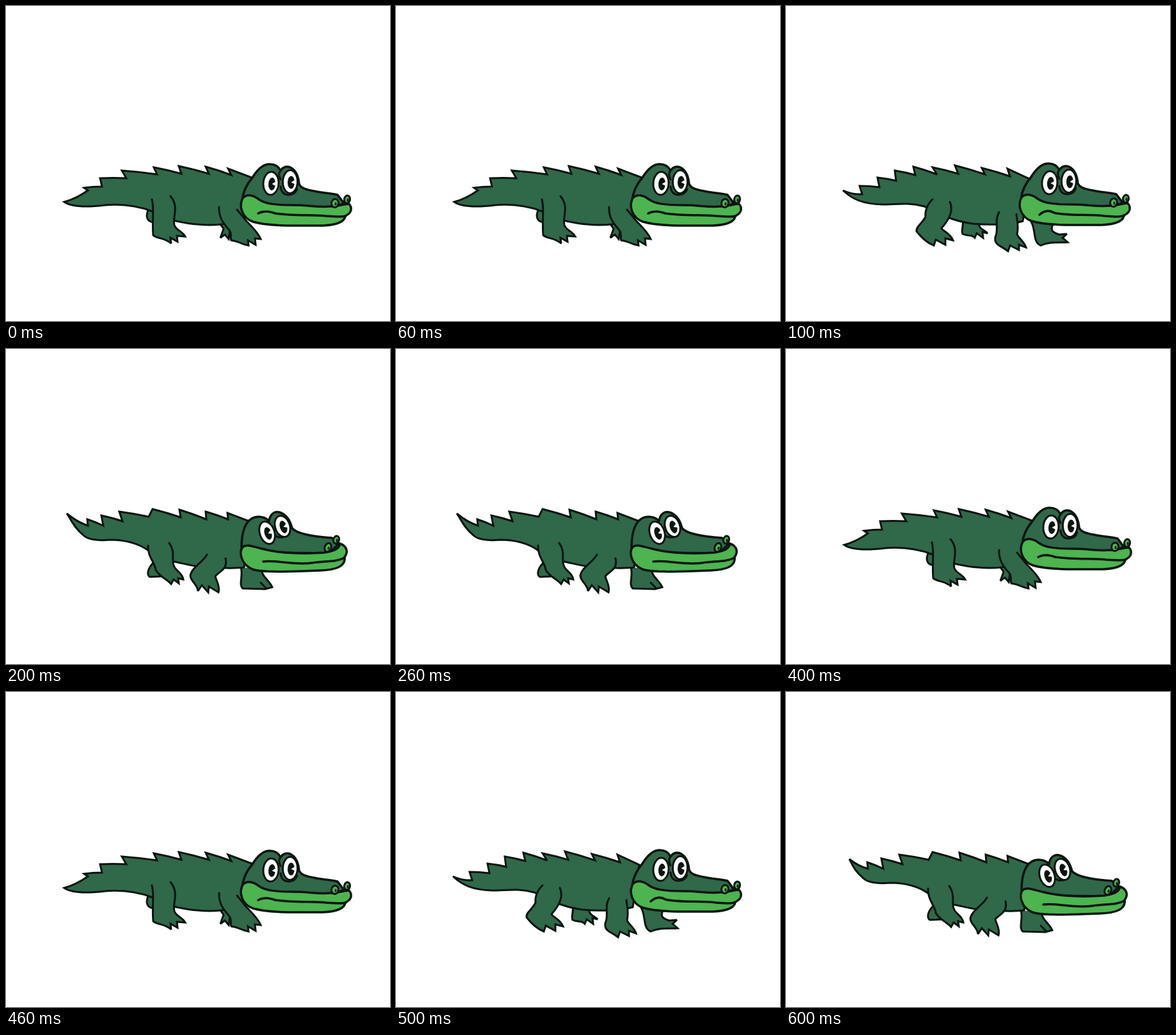
These frames come from a looping animation (600 by 492 pixels, 700 ms). An HTML page with a canvas:

```html
<!DOCTYPE html>
<html lang="en">
<head>
<meta charset="utf-8">
<title>Walking crocodile</title>
<style>
html, body { margin: 0; width: 100%; height: 100%; overflow: hidden; background: #fff; }
canvas { display: block; }
</style>
</head>
<body>
<canvas id="stage" width="600" height="492"></canvas>
<script>
const ctx = document.getElementById('stage').getContext('2d');
const INK = '#0b1510', LIGHT = '#4db450', SKIN = '#30684a';

// Heads: top of skull, jaw, mouth, ridge between the eyes, nostrils and eyes [x, y, rx, ry, tilt]
const levelHead = {
  skull: 'M369 303C371 287 378 276 385 268C393 255 402 247 412 247C420 247 426 251 429 257C433 251 440 249 446 253C454 258 457 267 458 278C461 285 470 287 481 289C494 292 507 292 518 295L528 308L508 316L400 314Z',
  jaw: 'M370 300C376 293 386 295 395 302C405 309 421 311 449 311C474 311 488 315 507 313C519 313 528 309 536 309C541 315 541 323 530 328C529 338 515 342 495 343C451 343 410 344 386 337C369 331 363 313 370 300Z',
  ridge: 'M429 257C425 261 427 266 429 271M429 282C430 291 434 295 442 295C449 295 453 291 455 286',
  nostrils: [[533, 302, 4.5, 6, .15], [514, 308, 5.5, 6.5, .15]],
  eyes: [[414, 277, 12, 18, .06], [444, 274.5, 11.5, 18, .02]]
};
const tiltedHead = {
  skull: 'M368 310C368 286 374 267 388 263C398 260 406 264 411 268C413 258 419 253 427 255C438 258 444 268 447 280C455 289 480 293 509 295L520 304L505 319L400 318Z',
  jaw: 'M370 309C377 304 386 309 400 312C430 320 470 320 497 318C511 316 520 313 522 304C533 308 535 317 529 325C531 340 515 345 490 346C450 347 402 350 385 344C366 336 364 316 370 309Z',
  mouth: 'M402 332C421 329 448 338 479 334C499 331 516 333 529 326',
  ridge: 'M411 268C407 271 410 276 414 279M420 291C427 297 440 294 443 288',
  nostrils: [[516, 298, 4.5, 6, .3], [503, 310, 5, 7, .35]],
  eyes: [[408, 287, 11.5, 18, -.32], [432, 277, 11.5, 17, -.32]]
};
const flatMouth = 'M394 324C403 319 412 321 421 324C450 328 480 326 500 328C514 329 524 330 531 328';
const curlMouth = 'M398 327C405 321 413 319 421 324C440 329 475 326 500 329C514 330 524 331 531 328';

// Ridge lists hold notch x, y then spike x, y from tail to neck
const poses = [
  {
    tail: [91, 306],
    ridge: [128, 288, 122, 284, 150, 282, 147, 269, 188, 269, 181, 257, 236, 263, 231, 252,
            274, 262, 270, 250, 317, 262, 312, 251, 352, 264, 347, 254],
    under: 'L384 268L372 332C355 342 320 343 299 341C284 340 272 337 262 335L229 321C206 312 180 309 155 311C130 314 104 315 91 306Z',
    far: ['M222 319C218 329 220 336 230 338L232 320',
          'M335 341L340 348L335 362L342 357L348 364L350 350L356 346'],
    near: ['M228 302C232 316 228 336 230 358C237 364 249 362 258 371L257 362L268 368L267 359L280 360C275 351 265 350 263 342C260 328 271 314 257 297',
           'M333 314C332 330 340 340 348 349C355 357 349 362 352 366C362 367 368 372 379 374L378 366L390 373L389 363L398 364C393 352 383 344 373 333C368 326 364 322 361 318'],
    mouth: flatMouth, head: levelHead
  },
  {
    tail: [89, 288],
    ridge: [119, 294, 115, 281, 146, 283, 143, 268, 172, 273, 170, 257, 202, 264, 199, 251,
            236, 263, 229, 252, 269, 262, 264, 249, 311, 263, 306, 253, 350, 266, 346, 254],
    under: 'L380 270L370 336C350 342 315 342 292 340C276 338 262 334 250 329L216 313C190 306 173 310 150 310C120 309 104 302 89 288Z',
    far: ['M276 336C278 344 273 350 276 356C283 360 290 356 295 362L298 355L308 362L307 353L315 355C309 349 300 348 302 338',
          'M383 337C391 350 385 369 398 374C411 368 424 370 440 369L432 362L439 356L427 357C418 354 411 351 418 340'],
    near: ['M229 302C220 310 217 322 218 329C212 341 203 344 204 352C212 362 220 370 231 374L234 365L249 373L249 363L261 366C256 354 244 351 243 347C252 337 263 321 256 306',
           'M333 322C325 335 333 350 327 361C325 374 336 374 347 383L350 374L364 381L364 373L375 377C372 367 362 362 361 356C364 345 361 335 360 325'],
    mouth: curlMouth, head: levelHead
  },
  {
    tail: [95, 257],
    ridge: [128, 276, 127, 266, 152, 276, 149, 260, 182, 269, 177, 254, 223, 262, 229, 250,
            273, 263, 271, 251, 313, 266, 312, 254, 347, 266, 346, 256],
    under: 'L380 269L372 341C350 344 323 341 302 340C287 338 273 334 262 332L223 315C205 302 183 298 162 298C142 300 127 297 121 291C106 278 104 270 95 257Z',
    far: ['M229 335C222 343 219 353 225 356L244 355L240 330',
          'M367 341C371 354 363 368 370 374L405 375L416 372C411 361 400 356 399 344M398 365L407 374'],
    near: ['M222 307C221 324 233 334 234 345C240 356 250 358 258 367L262 360L270 366L269 358L277 360C276 350 266 347 263 340C257 331 266 318 255 303',
           'M314 321C309 332 290 341 288 354C289 364 299 367 300 378L306 369L316 380L317 371L332 380C335 370 328 361 327 355C333 347 347 345 343 327'],
    mouth: tiltedHead.mouth, head: tiltedHead
  },
  {
    tail: [97, 291],
    ridge: [126, 290, 121, 282, 154, 284, 150, 270, 180, 274, 175, 259, 207, 267, 204, 255,
            238, 265, 233, 253, 275, 264, 273, 250, 320, 265, 314, 254, 355, 266, 350, 256],
    under: 'L385 269L374 337C352 342 322 344 300 342C287 341 278 339 271 337L237 325C219 314 197 310 176 310C157 312 143 311 128 309C113 305 105 298 97 291Z',
    far: ['M212 317C215 333 209 339 212 347L218 344L224 349L227 342L233 344C231 337 238 334 237 324'],
    near: ['M234 307C242 320 240 342 242 364C255 367 270 366 282 373L281 364L293 368L290 360L298 358C290 350 278 348 271 342C270 330 273 318 267 306',
           'M335 325C345 334 355 340 360 350C368 361 367 366 371 376L375 364L387 373L387 364L401 371C402 360 390 352 388 344C381 335 367 326 362 314'],
    mouth: curlMouth, head: levelHead
  }
];

// Each step: pose, head shift x and y, tail shift x and y
const steps = [
  [0, 0, 0, 0, 0], [1, -2, -1, 0, 0], [2, 0, 0, 0, 0], [3, 2, 1, 0, 0],
  [0, 0, 1, 0, 0], [1, 0, 0, 0, 0], [2, 0, 0, 4, 4]
];

function paint(d, fill, width = 3) {
  const path = new Path2D(d);
  if (fill) { ctx.fillStyle = fill; ctx.fill(path); }
  ctx.lineWidth = width;
  ctx.stroke(path);
}

function oval([x, y, rx, ry, tilt], fill, width) {
  ctx.beginPath();
  ctx.ellipse(x, y, rx, ry, tilt, 0, Math.PI * 2);
  ctx.fillStyle = fill;
  ctx.fill();
  if (width) { ctx.lineWidth = width; ctx.stroke(); }
}

function bodyPath({ tail, ridge, under }, dx, dy) {
  let x = tail[0] + dx, y = tail[1] + dy;
  const start = `${x} ${y}`;
  let d = `M${start}`;
  for (let i = 0; i < ridge.length; i += 4) {
    const [nx, ny, sx, sy] = ridge.slice(i, i + 4);
    const bend = i ? -1 : 4;
    d += `Q${(x + nx) / 2} ${(y + ny) / 2 + bend} ${nx} ${ny}L${sx} ${sy}`;
    x = sx;
    y = sy;
  }
  return d + under.replace(/\d+ \d+Z$/, start + 'Z');
}

function drawEye(eye) {
  const [x, y, , , tilt] = eye;
  oval(eye, '#fff', 3);
  ctx.save();
  ctx.translate(x + 1.5, y + 1);
  ctx.rotate(tilt);
  oval([0, 0, 5.5, 10, 0], INK);
  ctx.fillStyle = '#fff';
  ctx.fill(new Path2D('M0 0L7 -5L7 3Z'));
  ctx.restore();
}

function drawHead(head, mouth, dx, dy) {
  ctx.save();
  ctx.translate(dx, dy);
  paint(head.skull, SKIN, 3.5);
  paint(head.ridge, null, 3);
  paint(head.jaw, LIGHT, 3.5);
  paint(mouth, null, 3.5);
  for (const n of head.nostrils) {
    oval(n, LIGHT, 3);
    oval([n[0] + 1, n[1] + 1, 1.5, 2.5, n[4]], INK);
  }
  head.eyes.forEach(drawEye);
  ctx.restore();
}

function draw(time) {
  const [index, hx, hy, tx, ty] = steps[Math.floor(time / 100) % steps.length];
  const pose = poses[index];
  ctx.fillStyle = '#fff';
  ctx.fillRect(0, 0, 600, 492);
  ctx.strokeStyle = INK;
  ctx.lineJoin = 'miter';
  ctx.miterLimit = 3;
  ctx.lineCap = 'round';
  pose.far.forEach(leg => paint(leg, SKIN));
  paint(bodyPath(pose, tx, ty), SKIN);
  pose.near.forEach(leg => paint(leg, SKIN));
  drawHead(pose.head, pose.mouth, hx, hy);
}

const began = performance.now();
function tick() {
  draw(performance.now() - began);
  requestAnimationFrame(tick);
}
tick();
</script>
</body>
</html>
```
